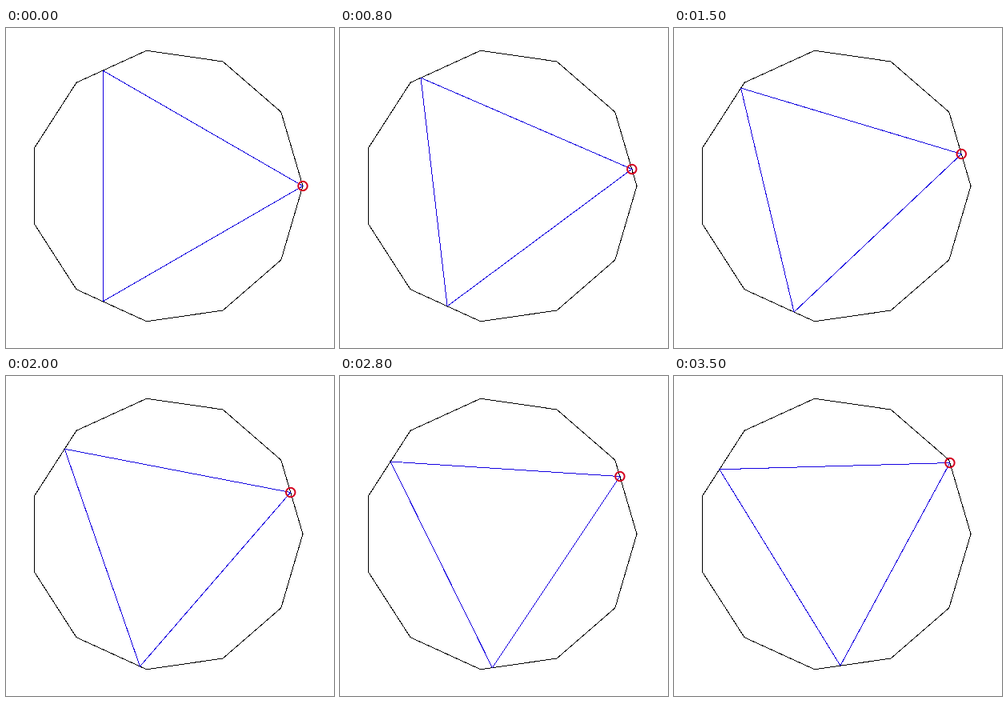
Write an HTML page that moves like this. It is 410 by 400 pixels and loops after 3.6 s.

```html
<!DOCTYPE html>
<html lang="en">
<head>
<meta charset="utf-8">
<title>Equilateral triangle sliding in an 11-gon</title>
<style>
  html, body { margin: 0; width: 100%; height: 100%; overflow: hidden; background: #fff; }
  svg { display: block; }
  polygon { fill: none; stroke-width: 1; shape-rendering: crispEdges; }
  #outline { stroke: #000; }
  #triangle { stroke: #1400e0; }
  #marker { fill: none; stroke: #d4001e; stroke-width: 2; }
</style>
</head>
<body>
<svg width="410" height="400" viewBox="0 0 410 400">
  <polygon id="outline"/>
  <polygon id="triangle"/>
  <circle id="marker" r="5.75"/>
</svg>
<script>
const SIDES = 11, CX = 200, CY = 197.5, R = 171;
const LOOP = 3600, STEP = 100;
const TURN = 2 * Math.PI / SIDES;
const APOTHEM = R * Math.cos(TURN / 2);

// [time in ms, share of the first edge travelled by the marker]
const PACE = [
  [0, 0], [800, .228], [1500, .432], [2000, .562],
  [2300, .648], [2800, .778], [3500, .962], [3600, .99]
];

const $ = id => document.getElementById(id);
const mix = (a, b, k) => a + (b - a) * k;
const corner = k => [CX + R * Math.cos(k * TURN), CY - R * Math.sin(k * TURN)];
const toPoints = list => list.map(p => p.map(v => v.toFixed(2)).join()).join(" ");

// Point on the outline; u counts edges from the right-hand corner.
function onEdge(u) {
  const k = Math.floor(u), a = corner(k), b = corner(k + 1);
  return [mix(a[0], b[0], u - k), mix(a[1], b[1], u - k)];
}

function isOutside([x, y]) {
  for (let k = 0; k < SIDES; k++) {
    const a = (k + .5) * TURN;
    if ((x - CX) * Math.cos(a) - (y - CY) * Math.sin(a) > APOTHEM) return true;
  }
  return false;
}

// Third corner of the equilateral triangle on p and q.
function apex(p, q) {
  const x = q[0] - p[0], y = q[1] - p[1], h = Math.sqrt(3) / 2;
  return [p[0] + x / 2 + h * y, p[1] - h * x + y / 2];
}

// Slide the second corner until the third one meets the outline.
function inscribe(p) {
  let lo = 3, hi = 5;
  for (let i = 0; i < 30; i++) {
    const mid = (lo + hi) / 2;
    if (isOutside(apex(p, onEdge(mid)))) hi = mid; else lo = mid;
  }
  const q = onEdge(lo);
  return [p, q, apex(p, q)];
}

function travel(t) {
  const i = PACE.findIndex(row => row[0] > t);
  const [t0, s0] = PACE[i - 1], [t1, s1] = PACE[i];
  return mix(s0, s1, (t - t0) / (t1 - t0));
}

function draw(now) {
  const t = Math.floor(now % LOOP / STEP) * STEP;
  const p = onEdge(travel(t));
  $("triangle").setAttribute("points", toPoints(inscribe(p)));
  $("marker").setAttribute("cx", p[0]);
  $("marker").setAttribute("cy", p[1]);
}

$("outline").setAttribute("points", toPoints(Array.from({ length: SIDES }, (_, k) => corner(k))));

const start = performance.now();
function tick() {
  draw(performance.now() - start);
  requestAnimationFrame(tick);
}
tick();
</script>
</body>
</html>
```
